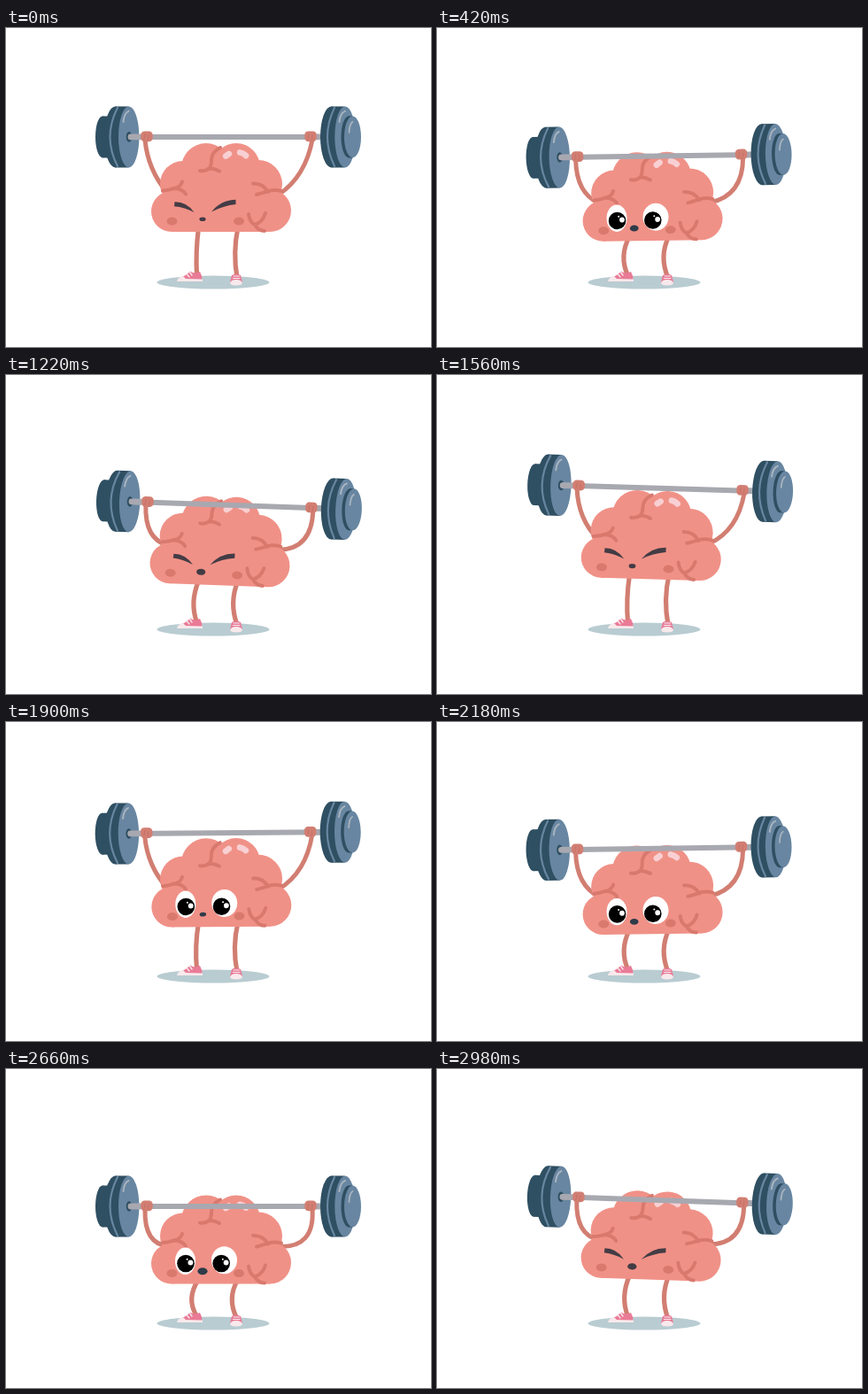
Animation, 480 px wide and 360 px high, one loop 3 s. Source, as an HTML page with a canvas:

```html
<!DOCTYPE html>
<html lang="en">
<head>
<meta charset="utf-8">
<title>Brain workout</title>
<style>
html, body { margin: 0; width: 100%; height: 100%; overflow: hidden; background: #fff; }
canvas { display: block; width: 480px; height: 360px; }
</style>
</head>
<body>
<canvas id="stage" width="480" height="360"></canvas>
<script>
const ctx = document.getElementById('stage').getContext('2d');
const LOOP = 3000, REP = 1784;
const SKIN = '#f09187', LIMB = '#d27e72', FOLD = '#d9796e';
const STEEL = '#a8a8b0', DARK = '#2f4f62', BLUE = '#6886a1', SHINE = '#a9b4bf';
const INK = '#433c45', PINK = '#e97b97', PALE = '#f8e9ec', GLOSS = '#f8d0d3';

const clamp = x => Math.max(0, Math.min(1, x));
const ramp = (t, a, b) => clamp((t - a) / (b - a));
const ease = x => (1 - Math.cos(Math.PI * x)) / 2;
const mix = (a, b, k) => a + (b - a) * k;

function oval(x, y, rx, ry, color) {
  ctx.beginPath();
  ctx.ellipse(x, y, rx, ry, 0, 0, Math.PI * 2);
  ctx.fillStyle = color;
  ctx.fill();
}

function stroke(d, color, width) {
  ctx.strokeStyle = color;
  ctx.lineWidth = width;
  ctx.stroke(new Path2D(d));
}

function fill(d, color) {
  ctx.fillStyle = color;
  ctx.fill(new Path2D(d));
}

function pose(t) {
  const u = t % REP;
  const down = ramp(u, 0, 690), up = ramp(u, 940, 1774);
  return {
    lift: ease(down) - ease(up),
    squat: ease(ramp(u, 0, 605)) - ease(ramp(u, 860, 1690)),
    tilt: 0.041 * Math.sin(Math.PI * up) - 0.0148 * Math.sin(Math.PI * down),
    open: u >= 90 && u < 960
  };
}

function drawLegs(k, dy) {
  const top = 225 + dy;
  stroke(`M217.5 ${top} Q${mix(214, 203, k)} ${mix(253, 259, k)} 215.5 279`, LIMB, 5.2);
  stroke(`M262 ${top} Q${mix(256, 249, k)} ${mix(253, 259, k)} 261 282`, LIMB, 5.2);
}

function drawShoes() {
  fill('M196 282 Q203 280 208 274.5 Q213 278 219 275 Q222 280 221.5 285 L198 286 Z', PINK);
  fill('M193 286 Q194 281 200 280 L203 283 L222 283.5 L222 286 Z', PALE);
  stroke('M204 277.5 L207 281 M207.5 275.5 L210 279', PALE, 1.3);
  fill('M255 279 Q260 276.5 265 279 L267 287 L253 287 Z', PINK);
  fill('M253 288 Q254 284 260 284 Q266 284 267 288 Q266 290.5 260 290.5 Q254 290.5 253 288 Z', PALE);
  stroke('M257 280 L263.5 280 M256.5 282.5 L264 282.5', PALE, 1.1);
}

function drawArms(k, bar, dy) {
  const y = bar + 3;
  stroke(`M157 ${y} Q${mix(160, 156, k)} ${mix(160, 198, k)} 183 ${187 + dy}`, LIMB, 5);
  stroke(`M346 ${y} Q${mix(338, 349, k)} ${mix(168, 202, k)} 308 ${188 + dy}`, LIMB, 5);
}

function drawEye(x, y, rx, ry, px) {
  oval(x, y, rx, ry, '#fff');
  oval(px, 207, 9.8, 9.8, '#000');
  oval(px + 5.4, 206, 2.9, 3, '#fff');
  oval(px + 1.6, 202.2, 1, 1, '#fff');
}

function drawFace(open, k) {
  oval(187.5, 218, 6, 4.5, FOLD);
  oval(263, 218, 6, 4.5, FOLD);
  if (open) {
    drawEye(202.5, 204.2, 11.5, 15.2, 203);
    drawEye(246.5, 203.3, 14.5, 15.5, 243.2);
  } else {
    fill('M190.5 196.3 Q204 196 212.5 208 Q202 202.5 190 201.3 Z', INK);
    fill('M259.5 193.8 Q243 194 232 207.5 Q245 200.5 259.5 199 Z', INK);
  }
  oval(222, 215.8, mix(3.6, 5.6, k), mix(2.3, 4, k), open ? '#2f3b49' : INK);
}

function drawBrain(open, k) {
  const lobes = [
    [187, 207, 23], [298, 206, 24], [200, 176, 26],
    [285, 176, 27], [226, 158, 28], [260, 157, 27]
  ];
  for (const [x, y, r] of lobes) oval(x, y, r, r, SKIN);
  fill('M187 230 L298 230 L298 180 L260 145 L226 145 L190 180 Z', SKIN);

  stroke('M242 135 Q232 140 232 149 Q232 156 229 159 M219 161 Q225 162 229 158.5 Q234 158 241 161.5', FOLD, 4);
  stroke('M177 183.5 Q185 183 189 181 Q197 180 199 173.5 M189 181 Q199 181 203 187.5', FOLD, 4);
  stroke('M279 175.5 Q290 175 296 185 M283 188 Q288 187 296 184 Q304 182 311 184', FOLD, 4);
  stroke('M274 210 Q275 219 281 222 Q285 229 292 229 M293 209 Q290 219 281 222', FOLD, 4);
  stroke('M248.3 144.5 L251.8 142', GLOSS, 6.8);
  stroke('M264.3 140.5 Q268 141 271 144', GLOSS, 6.8);
  drawFace(open, k);
}

// Dark side of a weight: a disc drawn out to the right.
function rim(x, depth, rx, ry) {
  oval(x, 0, rx, ry, DARK);
  ctx.fillRect(x, -ry, depth, ry * 2);
}

// Weights are drawn around y = 0, the height of the bar.
function drawLeftPlates() {
  rim(109, 12, 8, 23.5);
  rim(123.5, 15, 12.5, 34.5);
  stroke('M126 -33 Q109 0 126 33', BLUE, 2.2);
  oval(138.7, 0, 11.7, 34.5, BLUE);
  stroke('M132.5 -17 Q133.5 -27 138.5 -29', SHINE, 2);
  oval(139, 0, 3.3, 5.8, DARK);
}

function drawRightPlates() {
  rim(367.5, 15, 12.5, 34.5);
  stroke('M371 -33 Q355 0 371 33', BLUE, 2.2);
  oval(383, 0, 11.7, 34.5, BLUE);
  stroke('M376.5 -17 Q377.5 -27 383 -29', SHINE, 2);
  rim(387, 4, 8.5, 23.5);
  oval(391.5, 0, 9.5, 23.5, BLUE);
  stroke('M387.5 -5 Q388 -15 391.5 -17', SHINE, 1.8);
}

function drawFist(x) {
  ctx.beginPath();
  ctx.roundRect(x - 6.7, -6.5, 13.4, 11.8, 4.2);
  ctx.fillStyle = LIMB;
  ctx.fill();
  stroke(`M${x - 3} 3 L${x - 2} -3 M${x + 1.5} 4 L${x + 2} -2`, '#c46f64', 0.8);
}

function drawBarbell(bar) {
  ctx.save();
  ctx.translate(0, bar);
  drawLeftPlates();
  stroke('M141 0 L357 0', STEEL, 6);
  stroke('M141 0 L151 0 M351 0 L357 0', STEEL, 6.8);
  drawRightPlates();
  drawFist(159);
  drawFist(344);
  ctx.restore();
}

function draw(t) {
  const p = pose(t);
  const dy = 12.5 * p.squat, bar = 122.9 + 32.1 * p.lift;
  ctx.fillStyle = '#fff';
  ctx.fillRect(0, 0, 480, 360);
  ctx.lineCap = ctx.lineJoin = 'round';

  oval(234, 287, 63.5, 7.5, '#b9ccd2');
  drawLegs(p.squat, dy);
  drawShoes();

  ctx.save();
  ctx.translate(251, 165 + dy);
  ctx.rotate(p.tilt);
  ctx.translate(-251, -165 - dy);
  drawArms(p.lift, bar, dy);
  ctx.save();
  ctx.translate(0, dy);
  drawBrain(p.open, p.lift);
  ctx.restore();
  drawBarbell(bar);
  ctx.restore();
}

const start = performance.now();
function tick() {
  draw((performance.now() - start) % LOOP);
  requestAnimationFrame(tick);
}
tick();
</script>
</body>
</html>
```
